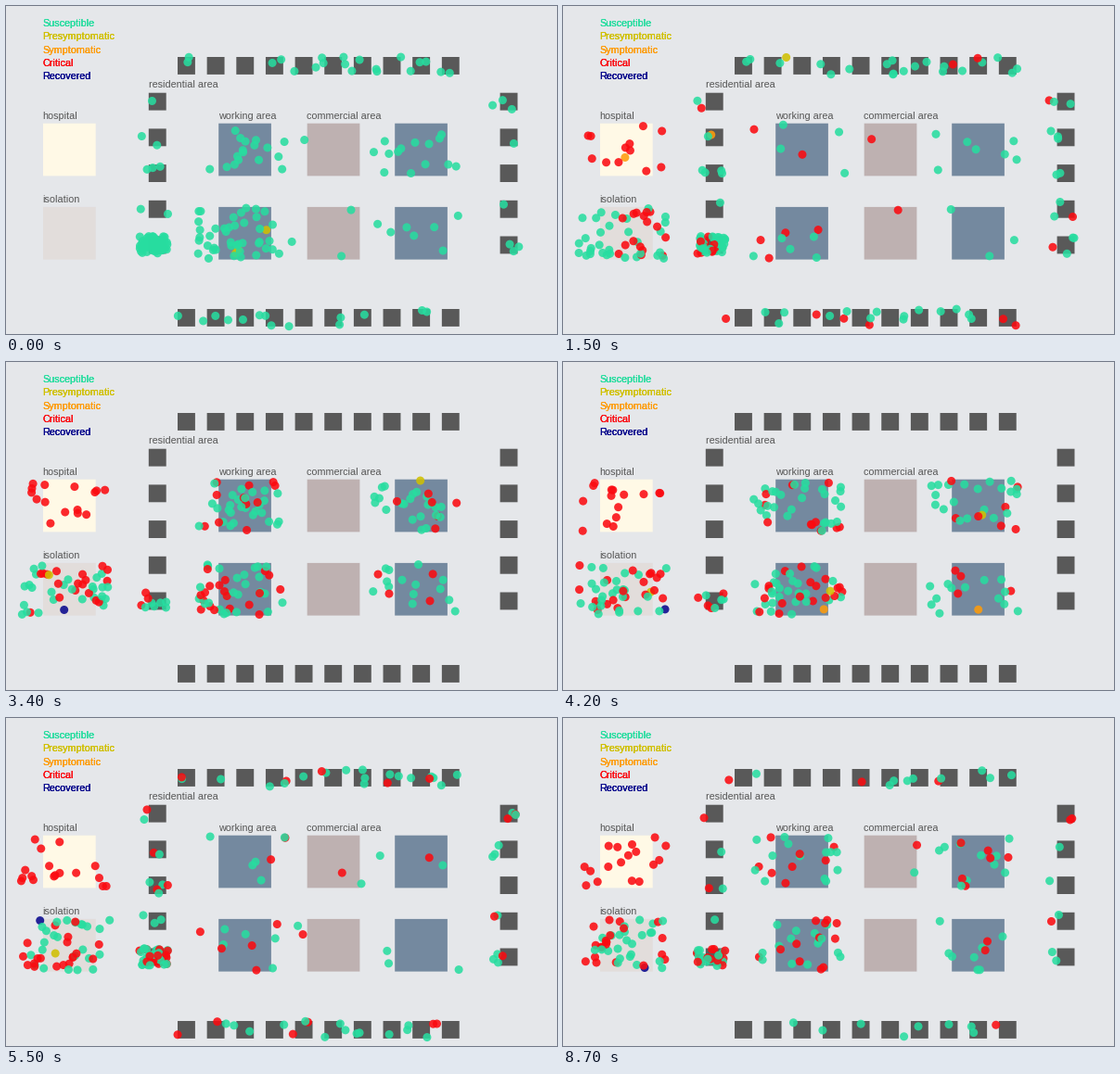
A matplotlib script for the animation above (8900 ms loop, 594x354 px).

```python
import math
import numpy as np
import matplotlib.pyplot as plt
from matplotlib.animation import FuncAnimation
from matplotlib.patches import Rectangle

W, H, DPI = 594, 354, 100
STEPS, LAST, DAY = 89, 68, 8
SUS, PRE, SYM, CRIT, REC = "#27dda0", "#d0c000", "#ff9c0a", "#fb0a10", "#06068c"
SMALL = 18.9
BIG = 3 * SMALL

UPPER, LOWER = 126.7, 216.9
HOSPITAL, ISOLATION = (40, UPPER), (40, LOWER)
OFFICES = [(x, y) for y in (UPPER, LOWER) for x in (229.2, 419.2)]
SHOPS = [(324.7, UPPER), (324.7, LOWER)]
HOMES = ([(185 + 31.65 * i, y) for y in (55, 327) for i in range(10)]
         + [(x, 93.7 + 38.7 * i) for x in (532.6, 153.8) for i in range(5)])
CORNER = HOMES[-1]


class Person:
    """Someone with a fixed home, office and course of illness."""

    def __init__(self, i, rng):
        # a bit more than half of the people share the crowded corner home
        self.crowded = rng.random() < 0.55
        self.home = CORNER if self.crowded else HOMES[rng.integers(29)]
        self.office = OFFICES[2 if self.crowded else rng.choice([0, 1, 3], p=[0.42, 0.38, 0.2])]
        self.needs_bed = rng.random() < 0.18
        self.isolated_from = rng.uniform(1, 14) if self.crowded and rng.random() < 0.48 else math.inf
        self.recovers = 20 if i == 0 else math.inf
        # five first cases, a fast wave, then a slow trickle
        u = rng.random()
        if i < 5:
            self.onset = -1
        elif u < 0.28:
            self.onset = -8 * math.log(1 - u / 0.28)
        else:
            self.onset = rng.uniform(0, 700)

    def state(self, t):
        if t >= self.recovers:
            return REC
        sick = t - self.onset
        return SUS if sick < 0 else PRE if sick < 2 else SYM if sick < 3.5 else CRIT

    def place(self, t, rng):
        if self.needs_bed and self.state(t) in (SYM, CRIT):
            return HOSPITAL
        if t >= self.isolated_from:
            return ISOLATION
        busy = working(t)
        if rng.random() >= busy * (0.8 if self.crowded else 1):
            return self.home
        if not self.crowded and rng.random() < 0.25 * (1 - busy):
            return SHOPS[rng.integers(2)]
        return self.office


def working(t):
    """Share of people out at work, on a daily rhythm."""
    return min(1, 0.6 + 0.5 * math.cos(2 * math.pi * (t - 2.2) / DAY))


def spot(place, rng):
    """Random position at a place, spilling over its left and right sides."""
    x, y = place
    if place in HOMES:
        return x + rng.uniform(-10, 21), y + rng.uniform(0, SMALL)
    return x + rng.uniform(-24, 72), y + rng.uniform(1, BIG - 1)


seeded = np.random.default_rng(12)
PEOPLE = [Person(i, seeded) for i in range(200)]


def step_at(frame):
    # two short pauses, then the last state stays
    if frame in (20, 66):
        return frame - 1
    return min(frame, LAST)


fig = plt.figure(figsize=(W / DPI, H / DPI), dpi=DPI, facecolor="#e5e7ea")
ax = fig.add_axes([0, 0, 1, 1])
ax.set(xlim=(0, W), ylim=(H, 0))
ax.axis("off")


def squares(places, size, color):
    for place in places:
        ax.add_patch(Rectangle(place, size, size, fc=color, lw=0, snap=False, zorder=1))


def label(x, y, text, color="#565656", layers=1):
    # extra layers thicken the smooth edges of the letters
    for _ in range(layers):
        ax.text(x, y, text, color=color, family="Liberation Sans",
                size=10.8 * 72 / DPI, va="baseline", zorder=2)


squares([HOSPITAL], BIG, "#fff9e6")
squares([ISOLATION], BIG, "#e2dddb")
squares(OFFICES, BIG, "#74899f")
squares(SHOPS, BIG, "#beb1b1")
squares(HOMES, SMALL, "#595959")

LEGEND = [("Susceptible", SUS), ("Presymptomatic", PRE), ("Symptomatic", SYM),
          ("Critical", CRIT), ("Recovered", REC)]
for i, (text, color) in enumerate(LEGEND):
    label(39.6, 22.3 + 14.2 * i, text, color, layers=3)
label(153.5, 88, "residential area")
label(39.6, 122, "hospital")
label(39.6, 212.4, "isolation")
label(229, 122, "working area")
label(324.3, 122, "commercial area")

cloud = ax.scatter([], [], s=(9 * 72 / DPI) ** 2, lw=0, alpha=0.87, zorder=3)


def draw(frame):
    t = step_at(frame)
    rng = np.random.default_rng(500 + t)
    cloud.set_offsets([spot(p.place(t, rng), rng) for p in PEOPLE])
    cloud.set_facecolor([p.state(t) for p in PEOPLE])
    return [cloud]


anim = FuncAnimation(fig, draw, frames=STEPS, interval=100, repeat=True,
                     repeat_delay=0, init_func=lambda: draw(0))
plt.show()
```
